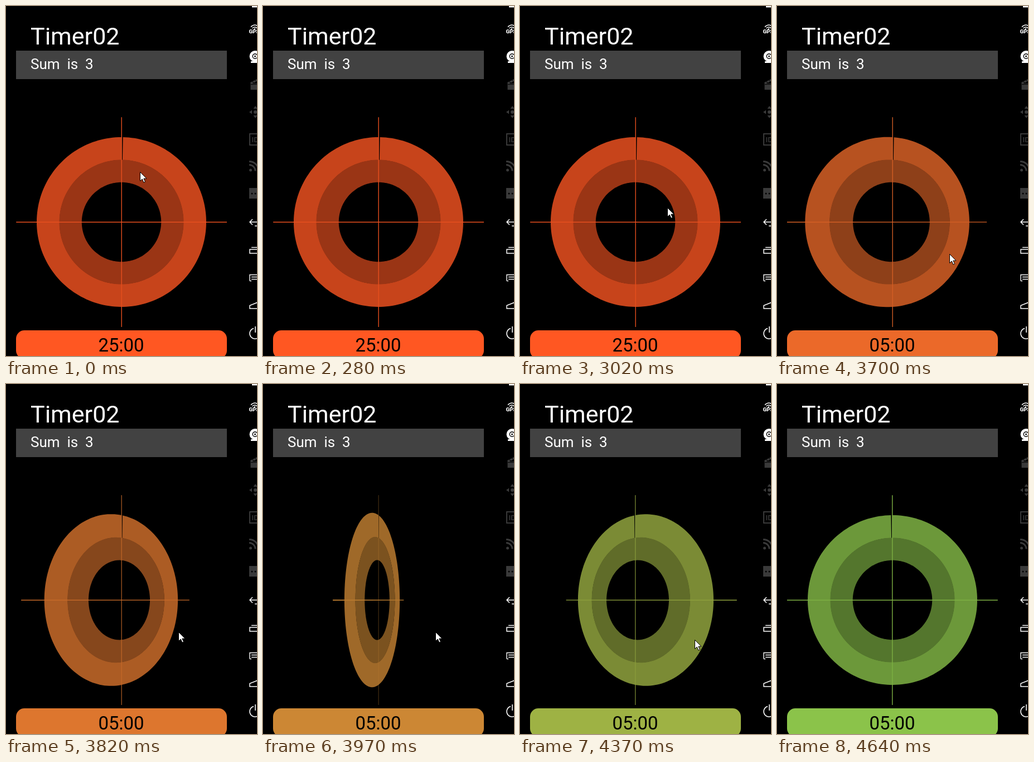
Animation, 450 px wide and 627 px high, one loop 5.26 s. Source, as an HTML page with a canvas:

```html
<!DOCTYPE html>
<html lang="en">
<head>
<meta charset="utf-8">
<title>Timer</title>
<style>
html, body { margin: 0; height: 100%; overflow: hidden; background: #000; }
canvas { display: block; }
</style>
</head>
<body>
<canvas width="450" height="627"></canvas>
<script>
const ctx = document.querySelector('canvas').getContext('2d');
const LOOP = 5260, CX = 207, CY = 387, DEPTH = 625;
const RED = [255, 87, 34], GREEN = [139, 195, 74];
const DIM = '#3a3a3a';

// Screen refresh moments, each with the pointer position while it is visible
const TICKS = [
  [0, 240, 297], [130, 304, 525], [280], [2460, 326, 447], [2610, 298, 329],
  [2760, 282, 292], [2880, 265, 354], [3020, 264, 361], [3430, 266, 365],
  [3580, 309, 444], [3700, 309, 444], [3820, 309, 444], [3970, 309, 444],
  [4100, 309, 444], [4250, 312, 456], [4370, 313, 458], [4520, 390, 500], [4640]
];

const clamp = v => Math.min(1, Math.max(0, v));
const ease = v => (1 - Math.cos(Math.PI * clamp(v))) / 2;
const flipAngle = t => Math.PI / 2 * (ease((t - 3533) / 620) + ease((t - 4045) / 596));
const tint = t => {
  const p = clamp((t - 3530) / 1000);
  return RED.map((v, i) => Math.round(v + (GREEN[i] - v) * p));
};
const shade = (rgb, k) => `rgb(${rgb.map(v => Math.round(v * k))})`;

function poly(points, color) {
  ctx.beginPath();
  points.forEach(([x, y]) => ctx.lineTo(x, y));
  ctx.closePath();
  ctx.fillStyle = color;
  ctx.fill();
}

function rect(x, y, w, h, color) {
  ctx.fillStyle = color;
  ctx.fillRect(x, y, w, h);
}

function stroke(path, color, width) {
  ctx.strokeStyle = color;
  ctx.lineWidth = width;
  ctx.stroke(new Path2D(path));
}

function disc(x, y, r, color) {
  ctx.beginPath();
  ctx.arc(x, y, r, 0, 2 * Math.PI);
  ctx.fillStyle = color;
  ctx.fill();
}

function text(str, x, y, size, color, align = 'left', weight = 400) {
  ctx.font = `${weight} ${size}px Roboto, sans-serif`;
  ctx.textAlign = align;
  ctx.fillStyle = color;
  ctx.fillText(str, x, y);
}

// Dial turning about its vertical axis, seen in perspective
function drawDial(angle, rgb) {
  const c = Math.cos(angle), s = Math.sin(angle);
  const project = ([x, y]) => {
    const k = 1 + x * s / DEPTH;
    return [CX + x * c / k, CY + y / k];
  };
  const shape = (points, color) => poly(points.map(project), color);
  const arc = (r, from, to) => Array.from({ length: 181 }, (_, i) => {
    const a = (from + (to - from) * i / 180 - 90) * Math.PI / 180;
    return [r * Math.cos(a), r * Math.sin(a)];
  });
  const bar = (w, h) => shape(
    [[-w, -h], [w, -h], [w, h], [-w, h]].map(([x, y]) => [x + .2, y + .2]), shade(rgb, .9));

  ctx.save();
  ctx.beginPath();
  ctx.rect(18, 199, 378, 376);
  ctx.clip();
  shape([...arc(152, 1, 360), ...arc(111, 360, 1)], shade(rgb, .78));
  shape(arc(111.5, 0, 360), shade(rgb, .605));
  shape(arc(71.2, 0, 360), '#000');
  bar(189, .7);
  bar(.7, 188);
  ctx.restore();
}

function drawSidebar() {
  rect(441, 0, 9, 2.5, '#fff');

  stroke('M439 37.5Q446 30.5 453 37.5M441.5 40Q446 35.5 450.5 40', '#fff', 1.5);
  disc(446, 41, 1.2, '#fff');
  text('GPS', 435.5, 49, 9.5, '#fff', 'left', 900);

  disc(446.5, 90, 10, '#fff');
  disc(446.5, 90, 5, '#000');
  disc(446.5, 90, 3.6, '#fff');
  disc(446.5, 90, 1.5, '#000');
  rect(439, 99, 11, 3, '#fff');

  rect(438.5, 139, 11.5, 11, DIM);
  poly([[438, 137], [450, 131], [450, 135], [439, 140]], DIM);
  stroke('M441 134l3 4M446 132l3 4M439 140.5h11', '#000', 1);

  poly([[436, 190], [441, 186.5], [441, 193.5]], DIM);
  poly([[447, 179], [443.5, 184], [450.5, 184]], DIM);
  poly([[447, 201], [443.5, 196], [450.5, 196]], DIM);
  disc(447, 190, 3, DIM);

  stroke('M451 229h-14v20h14', DIM, 2);
  text('ID', 440.5, 244, 13, DIM, 'left', 500);

  disc(438.5, 294, 2.5, DIM);
  stroke('M436 284.5a11 11 0 0 1 11 11M436 278.5a17 17 0 0 1 17 17', DIM, 3);

  rect(436, 326, 14, 19, DIM);
  disc(441, 336, 1.5, '#000');
  disc(447, 336, 1.5, '#000');

  stroke('M442 382l-5 5 5 5M437 387h13M446 394h4', '#fff', 1.5);
  stroke('M450 436h-13v7h13M440 432.5h10', '#fff', 1.5);
  stroke('M450 481.5h-13v11M440 485.5h10M440 489.5h10M437 492.5h3', '#fff', 1.4);
  stroke('M451 531l-14 5.5v5.5h14', '#fff', 1.5);
  stroke('M444 577.5a9.5 9.5 0 1 0 6 18M447 574v11', '#fff', 1.6);
}

function drawPointer(x, y) {
  ctx.save();
  ctx.translate(x + .5, y + .5);
  ctx.lineJoin = 'round';
  const arrow = 'M0 0V16L3.8 12.5 6.4 18.6 9 17.5 6.4 11.6H11.5Z';
  ctx.fillStyle = '#fff';
  ctx.fill(new Path2D(arrow));
  stroke(arrow, '#000', 1);
  ctx.restore();
}

function draw(now) {
  const [t, x, y] = TICKS.findLast(tick => tick[0] <= now % LOOP);
  const rgb = tint(t);
  rect(0, 0, 450, 627, '#000');
  text('Timer02', 44, 69, 43, '#fff');
  rect(18, 80, 378, 51, '#424242');
  text('Sum\u00a0 is\u00a0 3', 44, 113, 26, '#fff');
  drawDial(flipAngle(t), rgb);
  ctx.beginPath();
  ctx.roundRect(18, 581, 378, 51, 15);
  ctx.fillStyle = shade(rgb, 1);
  ctx.fill();
  text(t < 3580 ? '25:00' : '05:00', 206.5, 619, 33, '#000', 'center');
  drawSidebar();
  if (x !== undefined) drawPointer(x, y);
}

const start = performance.now();
function frame() {
  draw(performance.now() - start);
  requestAnimationFrame(frame);
}
frame();
</script>
</body>
</html>
```
